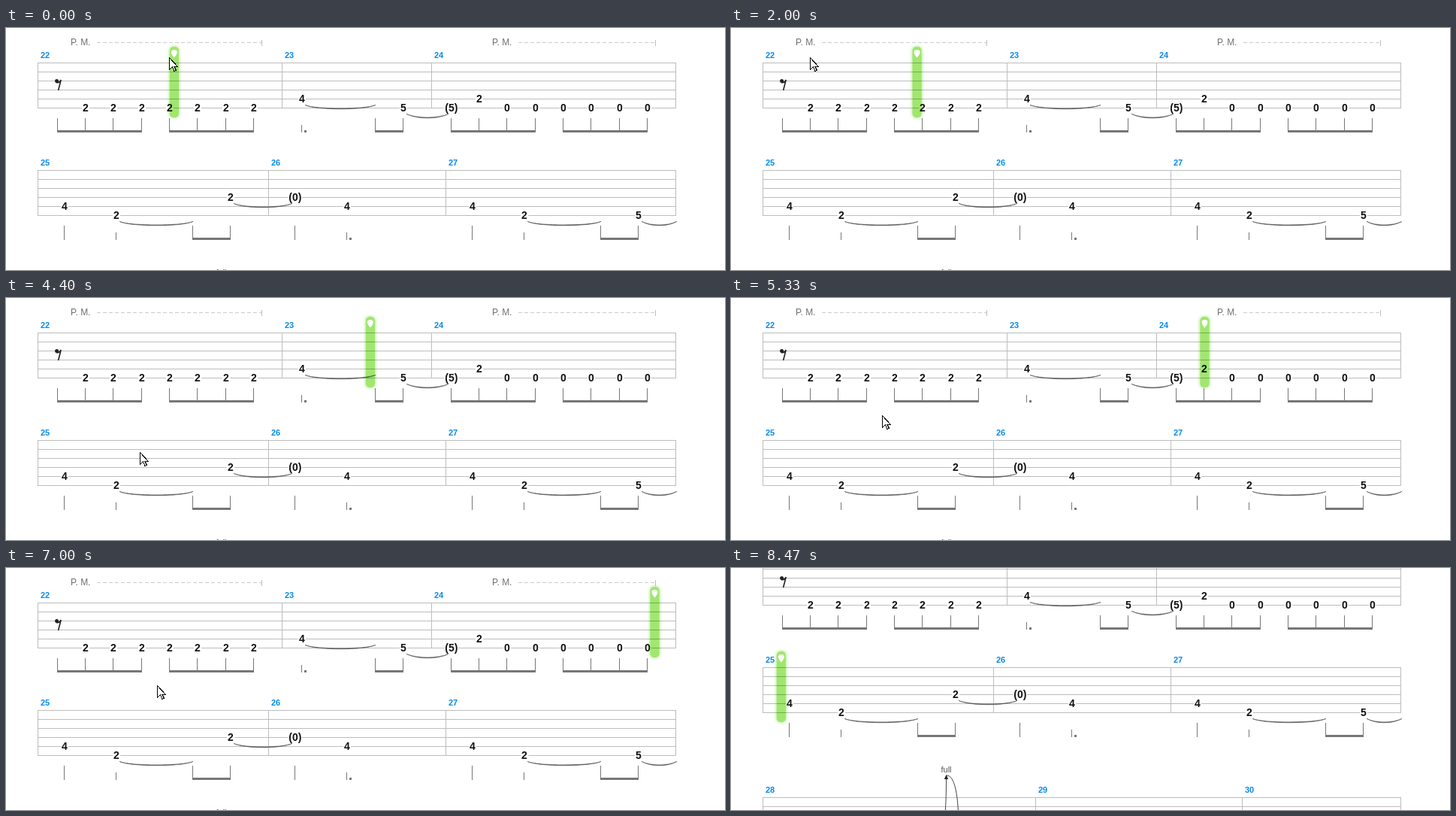
These frames come from a looping animation (957x322 px, 9.39 s). An HTML page:

```html
<!DOCTYPE html>
<html lang="en">
<head>
<meta charset="utf-8">
<title>Tablature player</title>
<style>
  html, body { margin: 0; width: 100%; height: 100%; overflow: hidden; background: #fff; }
  svg { display: block; width: 100%; height: 100%; }
  text { font-family: "Liberation Sans", Arial, sans-serif; }
  .staff, .stem, .gap, #mouse { shape-rendering: crispEdges; }
  .staff { fill: #bdbdbd; }
  .stem { fill: #777; }
  .gap { fill: #fff; }
  .bar { font-size: 11px; font-weight: bold; fill: #0b8ae8; }
  .note { font-size: 14px; font-weight: bold; fill: #111; text-anchor: middle; }
  .tie { fill: #555; stroke: #555; stroke-width: .6; }
  .mute { font-size: 12px; fill: #707070; }
  .dash { stroke: #ccc; stroke-dasharray: 5 3; fill: none; }
  .bend { fill: none; stroke: #444; }
  .full { font-size: 11px; fill: #555; text-anchor: middle; }
  .ink { fill: #222; }
  .head { fill: #a0e66f; filter: drop-shadow(0 0 2px #8fe85a); }
  #play { mix-blend-mode: multiply; }
</style>
</head>
<body>
<svg viewBox="0 0 957 322">
  <g id="page">
    <g id="score"></g>
    <g id="play">
      <rect class="head" x="-6" y="0" width="12" height="94" rx="5"/>
      <path fill="#fff" d="M-4 7Q-4 4 0 4T4 7Q4 10 0 14.500Q-4 10-4 7Z"/>
    </g>
  </g>
  <path id="mouse" fill="#fff" stroke="#000" d="M.5.5V16.500L4.500 12.500 7 18.500 9.500 17.500 7 12.500H11.500Z"/>
</svg>
<script>
const LEFT = 42, RIGHT = 891, GAP = 12, LEAD = .7;
const SPACE = { 1: 1, 2: 1.38, 4: 2.04, 6: 2.63 };

// Each token: length in eighths, then string and fret; r = rest, - = held, ~ = tie to the next
const rows = [
  { y: 46, first: 22, tab: "1r 152 152 152 152 152 152 152|644~ 1- 155~|15(5) 142 150 150 150 150 150 150" },
  { y: 189, first: 25, tab: "244 452~ 1- 132~|23(0) 644|244 452~ 1- 155~" },
  { y: 362, first: 28, tab: "15(0) 142 250~ 1- 142 142 140|244 452~ 1- 132~|23(0) 644" }
];

// Spread the bars over the row in proportion to note lengths
function layout(row) {
  const bars = row.tab.split("|").map(b => b.split(" ").map(s => {
    const [, len, line, fret, tied] = s.match(/(\d)([\dr-])([^~]*)(~?)/);
    return { len: +len, line, fret, tied };
  }));
  const units = bars.flat().reduce((sum, n) => sum + SPACE[n.len], bars.length * LEAD);
  const unit = (RIGHT - LEFT) / units;
  let x = LEFT, time = 0;
  row.bars = [];
  for (const bar of bars) {
    x = Math.round(x);
    row.bars.push(x);
    x += LEAD * unit;
    for (const n of bar) {
      Object.assign(n, { x, stem: Math.floor(x), time });
      x += SPACE[n.len] * unit;
      time += n.len;
    }
  }
  row.notes = bars.flat();
}

const rect = (cls, x, y, w, h) =>
  `<rect class="${cls}" x="${x}" y="${y}" width="${w}" height="${h}"/>`;
const text = (cls, x, y, s) => `<text class="${cls}" x="${x}" y="${y}">${s}</text>`;

function tie(x1, x2, y) {
  const b = Math.min(14, (x2 - x1) / 4);
  const curve = (a, c, s, dip) => `C${a + s * b} ${y + dip} ${c - s * b} ${y + dip} ${c} ${y}`;
  return `<path class="tie" d="M${x1} ${y}${curve(x1, x2, 1, 6)}${curve(x2, x1, -1, 7.2)}Z"/>`;
}

const rest = (x, y) => `<circle class="ink" cx="${x - .4}" cy="${y + 24.6}" r="2.5"/>
  <path d="M${x - 1} ${y + 26.5}q4 1.200 6.200-3.500l-3.600 14" fill="none" stroke="#222" stroke-width="1.600"/>`;

function drawNote(n, i, { y, notes }) {
  const top = y + (n.len < 4 ? 74 : 83), next = notes[i + 1];
  let out = rect("stem", n.stem, top, 1, y + 93 - top);
  if (n.len === 6) out += rect("stem", n.stem + 4, y + 90, 3, 3);
  const beamed = next && n.len + next.len === 2 && n.time >> 2 === next.time >> 2;
  if (beamed) out += rect("stem", n.stem, y + 90, next.stem - n.stem + 1, 3);
  if (n.line === "r") out += rest(n.stem, y);
  if (n.fret) {
    const cx = n.stem + .9, ny = y + n.line * GAP, w = n.fret.length > 1 ? 19 : 10;
    out += rect("gap", Math.round(cx - w / 2), ny - 5, w, 11) + text("note", cx, ny + 5, n.fret);
    if (n.tied) out += tie(n.stem + 5, next ? next.stem + (next.fret ? -3 : 1) : RIGHT + 2, ny + 8.4);
  }
  return out;
}

function drawRow(r, k) {
  let out = "";
  for (let i = 0; i < 6; i++) out += rect("staff", LEFT, r.y + i * GAP, RIGHT - LEFT + 1, 1);
  for (const x of [...r.bars, RIGHT]) out += rect("staff", x, r.y, 1, 5 * GAP + 1);
  r.bars.forEach((x, i) => out += text("bar", x + 4, r.y - 6, r.first + i));
  out += r.notes.map((n, i) => drawNote(n, i, r)).join("");
  const [head] = r.notes, before = k && rows[k - 1].notes.at(-1);
  if (before && before.tied) out += tie(LEFT + 1, head.stem - 3, r.y + head.line * GAP + 8.4);
  return out;
}

const mute = (x, end) => text("mute", x, 23, "P. M.") +
  `<path class="dash" d="M${x + 35} 19.500H${end}"/>` + rect("staff", end, 16, 1, 8);

const bend = text("full", 286.5, 329, "full") +
  `<path class="bend" d="M276 406C284 405 286.500 385 286.500 336M287 333C298 333 303 360 303 404"/>
  <path class="ink" d="M286.500 332l2.700 6h-5.400ZM303 407l-2.700-6h5.400Z"/>`;

const $ = id => document.getElementById(id);
rows.forEach(layout);
$("score").innerHTML = rows.map(drawRow).join("") + mute(86, 340) + mute(647, 864) + bend;

const LOOP = 9390, FRAME = 1000 / 15, EIGHTH = 60000 / 110 / 2;
const START = 4.17, WRAP = 23.52, STOP = 23.86;

const upper = [...rows[0].notes.map(n => [n.time, n.x]), [WRAP, RIGHT]];
const lower = [[WRAP, LEFT], [24, rows[1].notes[0].x]];

// Pointer legs after the opening sweep: [from ms, to ms, x, y]
const legs = [
  [1670, 1730, 138, 29], [1867, 2000, 105, 39], [2000, 2133, 57, 95],
  [2133, 2467, 92, 306], [2467, 2800, 130, 267], [3800, 4067, 97, 305],
  [4067, 4400, 178, 205], [4400, 4800, 201, 156], [7800, 8400, 201, 330]
];

const part = (t, from, to) => Math.min(1, Math.max(0, (t - from) / (to - from)));
const swing = (t, from, to) => .5 - Math.cos(part(t, from, to) * Math.PI) / 2;

function along(keys, t) {
  const i = Math.max(1, keys.findIndex(k => k[0] >= t));
  const [a, b] = [keys[i - 1], keys[i]];
  return a[1] + (b[1] - a[1]) * part(t, a[0], b[0]);
}

function pointer(t) {
  const s = Math.min(t, 1467);
  let x = 140 + 96 * Math.cos((s - 1000) / 907 * 2 * Math.PI);
  let y = 39 - s / 180;
  for (const [from, to, tx, ty] of legs) {
    const u = part(t, from, to);
    x += (tx - x) * u;
    y += (ty - y) * u;
  }
  return [Math.round(x), Math.round(y)];
}

const place = (id, x, y) => $(id).setAttribute("transform", `translate(${x.toFixed(2)} ${y.toFixed(2)})`);

function draw(now) {
  const t = Math.floor((now % LOOP + 4) / FRAME) * FRAME;
  const beat = Math.min(STOP, Math.max(START, (t - 2000) / EIGHTH + 4.804));
  const wrapped = beat > WRAP;
  place("play", along(wrapped ? lower : upper, beat), rows[+wrapped].y - 21);
  place("page", 0, Math.round(100 * swing(t, 7600, 8460) - 157 * swing(t, 7104, 7330)));
  place("mouse", ...pointer(t));
  requestAnimationFrame(draw);
}
draw(performance.now());
</script>
</body>
</html>
```
